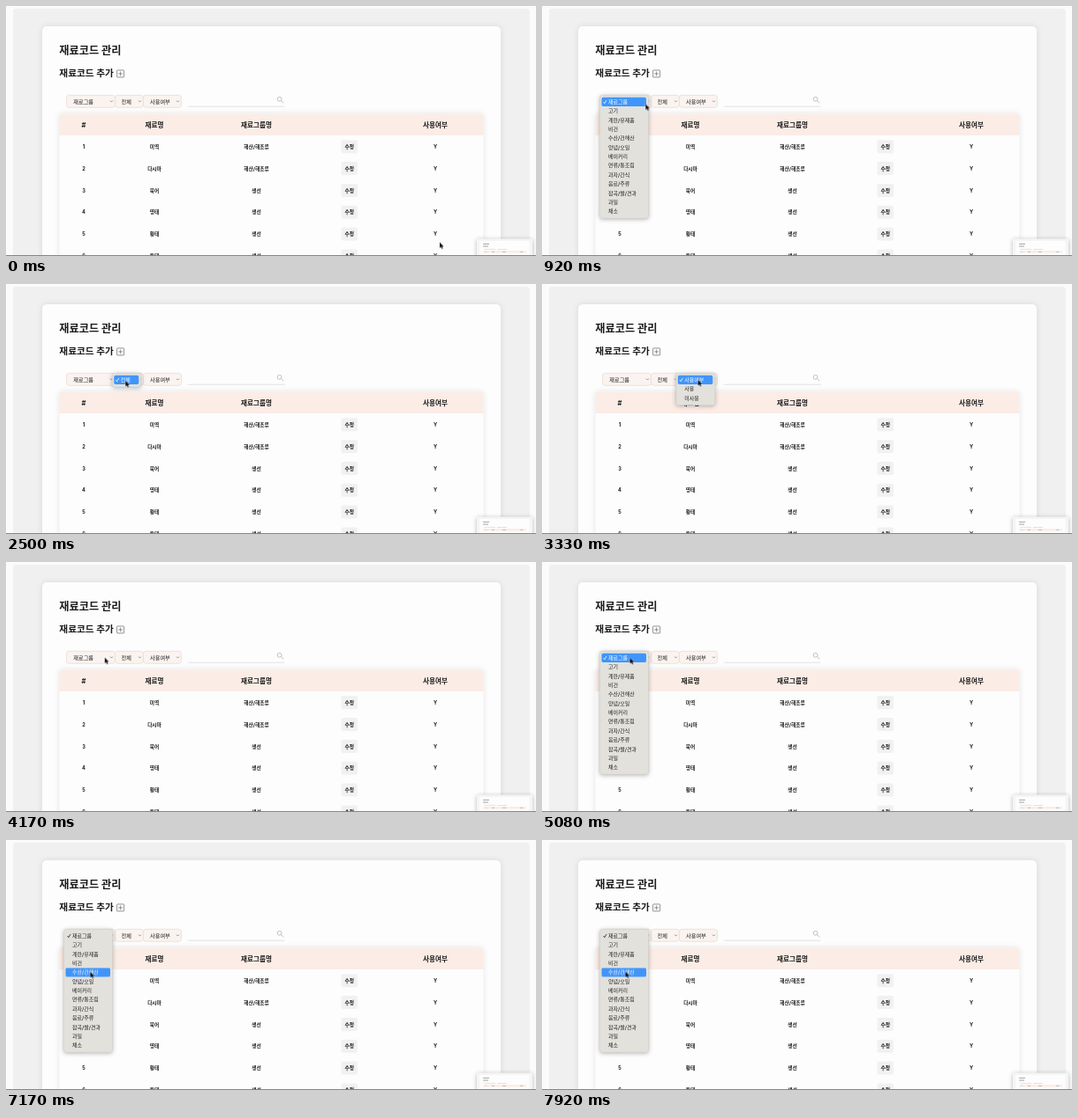
Animation of 600 by 284 pixels, one loop 8 s. Source, as an HTML page:

```html
<!DOCTYPE html>
<html lang="ko">
<head>
<meta charset="utf-8">
<title>재료코드 관리</title>
<style>
html, body { margin: 0; width: 100%; height: 100%; overflow: hidden; background: #fbfbfb; }
svg { display: block; width: 600px; height: 284px; }
text { font-family: Inter, "Noto Sans CJK KR", "Noto Sans CJK", sans-serif; white-space: pre; }
.panel { filter: drop-shadow(0 1.5px 2.5px rgba(0,0,0,.28)); }
.soft { filter: drop-shadow(0 0 3px rgba(0,0,0,.1)); }
.menu, .hl, .still, #cursor { animation: 8s infinite step-end; }
.menu { visibility: hidden; }
#group { animation-name: group; }
#all { animation-name: all; }
#used { animation-name: used; }
#group .hl { animation-name: down; }
#group .still { animation-name: up; }
#cursor { animation-name: cursor; animation-timing-function: ease-in-out; }

@keyframes group {
  0%, 23.9% { visibility: hidden; }
  11.4%, 56.2% { visibility: visible; }
}
@keyframes all {
  0%, 33.3% { visibility: hidden; }
  29.1% { visibility: visible; }
}
@keyframes used {
  0%, 46.8% { visibility: hidden; }
  39.5% { visibility: visible; }
}
/* the highlight slides down while its contents stay in place */
@keyframes down {
  0% { transform: none; }
  67.7% { transform: translateY(10.35px); }
  72.9% { transform: translateY(20.7px); }
  77% { transform: translateY(31.05px); }
  87.4%, 97.8% { transform: translateY(41.4px); }
  91.6% { transform: translateY(51.75px); }
}
@keyframes up {
  0% { transform: none; }
  67.7% { transform: translateY(-10.35px); }
  72.9% { transform: translateY(-20.7px); }
  77% { transform: translateY(-31.05px); }
  87.4%, 97.8% { transform: translateY(-41.4px); }
  91.6% { transform: translateY(-51.75px); }
}
@keyframes cursor {
  0%, .5% { transform: translate(491px, 268.5px); }
  9.4% { transform: translate(109px, 104px); }
  11.4%, 22% { transform: translate(117.3px, 111.5px); }
  28%, 33% { transform: translate(135.3px, 110px); }
  39%, 46% { transform: translate(176.6px, 109px); }
  54.2% { transform: translate(102px, 108.5px); }
  56%, 65% { transform: translate(99.6px, 109px); animation-timing-function: linear; }
  75% { transform: translate(97px, 127px); animation-timing-function: linear; }
  78.1% { transform: translate(95.6px, 135.3px); animation-timing-function: linear; }
  81.2%, 85.4% { transform: translate(95.6px, 142px); }
  93.7%, 95.8% { transform: translate(95.4px, 157px); }
  99%, 100% { transform: translate(94.5px, 149.5px); }
}
</style>
</head>
<body>
<svg viewBox="0 0 600 284">
  <rect x="8" y="3" width="585" height="290" rx="4" fill="#f0f0f0"/>
  <rect class="soft" x="41" y="23" width="519" height="270" rx="5" fill="#fdfdfd"/>
  <g fill="none" stroke="#777" stroke-width=".8">
    <rect x="125.6" y="72.9" width="8" height="8" rx=".6"/>
    <path d="M127.2 76.9h4.8M129.6 74.5v4.8"/>
  </g>
  <path d="M205.5 114.2H315.5" stroke="#dcdcdc" stroke-width=".8"/>
  <g fill="none" stroke="#b8b8b8" stroke-width=".9">
    <circle cx="309.6" cy="105.8" r="2.4"/>
    <path d="M311.4 107.6L314.2 110.3"/>
  </g>
  <g class="soft">
    <path d="M60.5 293V126.500a4 4 0 0 1 4-4H536.500a4 4 0 0 1 4 4V293Z" fill="#fdfdfd"/>
    <path d="M60.500 147V126.500a4 4 0 0 1 4-4H536.500a4 4 0 0 1 4 4V147Z" fill="#fbece5"/>
  </g>
  <g id="page"></g>
  <g id="thumb">
    <rect class="panel" x="533" y="264.500" width="63" height="24" rx="1" fill="#f5f5f5"/>
    <rect x="536.500" y="267" width="56" height="20" fill="#fdfdfd"/>
    <path d="M540 270.300h7M540 273h6" stroke="#999" stroke-width=".9"/>
    <path d="M541 276.300h13M556 276.500h11" stroke="#eadfd8" stroke-width="1"/>
    <path d="M540 279.300h49" stroke="#fbece5" stroke-width="2.400"/>
    <path d="M543 279.300h1M550 279.300h3M562 279.300h4M582 279.300h3" stroke="#aaa" stroke-width=".7"/>
  </g>
  <rect y="283" width="600" height="1" fill="#858585"/>
  <g id="menus"></g>
  <path id="cursor" d="M0 0V6.400L1.500 5.100L2.600 7.500L3.700 7L2.600 4.700H4.600Z"
        fill="#111" stroke="#fff" stroke-width=".5" paint-order="stroke"/>
</svg>
<script>
const PITCH = 10.35;

// Text is placed by its vertical centre.
function label(s, x, cy, size, { weight = 700, anchor = "middle", fill = "#1c1c1c" } = {}) {
  return `<text x="${x}" y="${cy + size * .37}" font-size="${size}" font-weight="${weight}"
    text-anchor="${anchor}" fill="${fill}">${s}</text>`;
}

function select(s, x, w, tx) {
  const cx = x + w - 4;
  return `<rect x="${x}" y="101.300" width="${w}" height="14" rx="3" fill="#faf3ef" stroke="#e9d9d0" stroke-width=".7"/>
    <path d="M${cx - 1.4} 107.600l1.400 1.400l1.400-1.400" fill="none" stroke="#666" stroke-width=".7"/>`
    + label(s, tx, 108.500, 6.2, { anchor: "start", weight: 500 });
}

function row([name, group], i) {
  const y = 159.700 + i * 24.850;
  return label(i + 1, 88, y, 5.7) + label(name, 168, y, 5.7) + label(group, 283.500, y, 5.7)
    + `<rect x="379.500" y="${y - 7.500}" width="18.500" height="15" rx="2" fill="#f1f1f1"/>`
    + label("수정", 388.800, y, 5.7) + label("Y", 486, y, 5.7);
}

function menu(id, x, w, items) {
  const list = fill => items.map((s, i) =>
    label(s, x + 9.500, 108.800 + i * PITCH, 6, { anchor: "start", weight: 500, fill })).join("")
    + `<path d="M${x + 4} 109l1.300 1.700l2.200-3.800" fill="none" stroke="${fill}" stroke-width=".8"/>`;
  const h = items.length * PITCH + 5.500;
  return `<g id="${id}" class="menu">
    <clipPath id="${id}Clip"><rect x="${x + 2}" y="103.800" width="${w - 4.500}" height="10.300" rx="1.800"/></clipPath>
    <rect class="panel" x="${x}" y="101.200" width="${w}" height="${h}" rx="3" fill="#e2e1dc" stroke="#c9c8c4" stroke-width=".4"/>
    ${list("#222")}
    <g class="hl" clip-path="url(#${id}Clip)"><g class="still">
      <rect x="${x}" y="101" width="${w}" height="${h}" fill="#4095fb"/>${list("#fff")}
    </g></g></g>`;
}

const heads = [["#", 88], ["재료명", 168], ["재료그룹명", 283.5], ["사용여부", 486]];
const rows = [["미역", "해산/해조류"], ["다시마", "해산/해조류"], ["북어", "생선"],
  ["명태", "생선"], ["황태", "생선"], ["동태", "생선"]];
const groups = ["재료그룹", "고기", "계란/유제품", "비건", "수산/건해산", "양념/오일", "베이커리",
  "면류/통조림", "과자/간식", "음료/주류", "잡곡/쌀/견과", "과일", "채소"];

document.getElementById("page").innerHTML =
  label("재료코드 관리", 60.300, 50.300, 12.2, { anchor: "start" })
  + label("재료코드 추가", 60.300, 76.200, 10.7, { anchor: "start" })
  + select("재료그룹", 68.500, 55, 76.300)
  + select("전체", 123.500, 32, 130.500)
  + select("사용여부", 155.500, 43, 163)
  + heads.map(([s, x]) => label(s, x, 135.300, 7.6)).join("")
  + rows.map(row).join("");

document.getElementById("menus").innerHTML =
  menu("group", 65.5, 55, groups)
  + menu("all", 120.3, 32.5, ["전체"])
  + menu("used", 151.8, 44, ["사용여부", "사용", "미사용"]);
</script>
</body>
</html>
```
